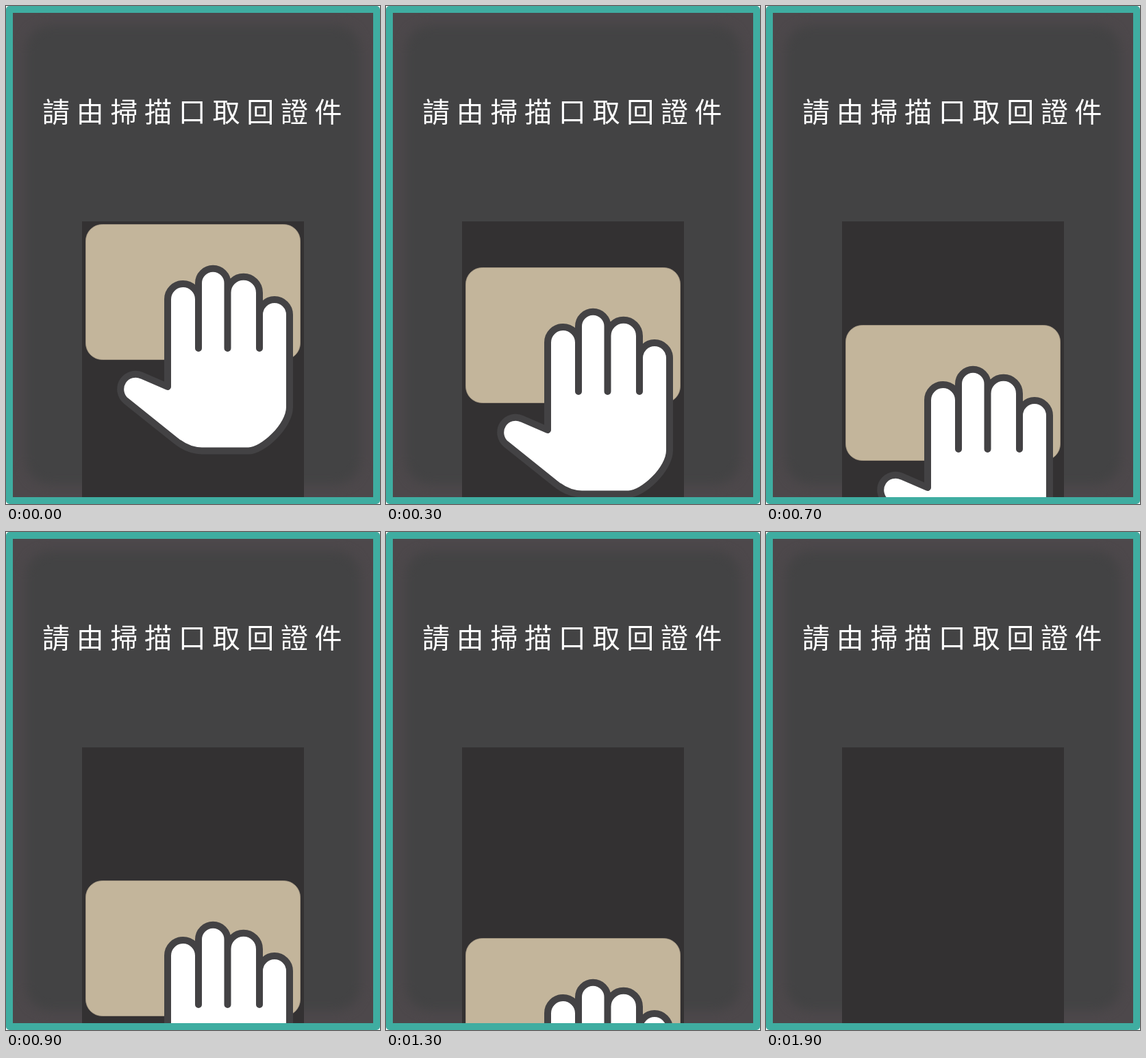
Recreate the animation shown at these times as an HTML page. Size 546 by 726 pixels, loop 3900 ms.

```html
<!DOCTYPE html>
<html lang="zh-Hant">
<head>
<meta charset="utf-8">
<style>
  html, body { margin: 0; height: 100%; overflow: hidden; background: #fff; }
  svg { display: block; }
  text {
    font: 300 40px "Noto Sans CJK TC", "Noto Sans CJK JP", "Noto Sans CJK", sans-serif;
    letter-spacing: 9.7px;
    fill: #fff;
  }
  .hand {
    fill: #fff;
    stroke: #434244;
    stroke-width: 10;
    stroke-linecap: round;
    stroke-linejoin: round;
  }
</style>
</head>
<body>
<svg width="546" height="726" viewBox="0 0 546 726">
  <filter id="soft" x="-20%" y="-20%" width="140%" height="140%" color-interpolation-filters="sRGB">
    <feGaussianBlur stdDeviation="8"/>
  </filter>
  <rect x="5" y="5" width="536" height="716" fill="#4d484b"/>
  <rect x="28" y="28" width="490" height="670" rx="36" fill="#434344" filter="url(#soft)"/>
  <text x="53" y="168.5">請由掃描口取回證件</text>
  <rect x="111" y="314" width="324" height="402" fill="#333132"/>

  <g id="mover">
    <rect x="116.5" y="318.5" width="313" height="197" rx="24" fill="#c3b59b" stroke="#ad9f88" stroke-width=".8"/>
    <path class="hand" d="M236 555V427.5a22.5 22.5 0 0 1 45 0V404a21.25 21.25 0 0 1 42.5 0V418
      a23.25 23.25 0 0 1 46.5 0V450a22 22 0 0 1 44 0V585C414 612 375 648.5 354 648.5H286
      C272 648.5 258 642 247 633L175 575.500A22 22 0 0 1 199 539Z
      M281 427V499M323.500 418V499M370 450V499"/>
  </g>

  <rect x="5" y="5" width="536" height="716" fill="none" stroke="#3fada1" stroke-width="10" stroke-linejoin="round"/>
</svg>
<script>
  const LOOP = 3900, STEP_MS = 100, STEP_PX = 21.07, STEPS = 19;
  const mover = document.getElementById('mover');

  function draw() {
    const step = Math.min(STEPS, Math.floor(performance.now() % LOOP / STEP_MS));
    mover.setAttribute('transform', `translate(0 ${Math.round(step * STEP_PX)})`);
    requestAnimationFrame(draw);
  }
  draw();
</script>
</body>
</html>
```
